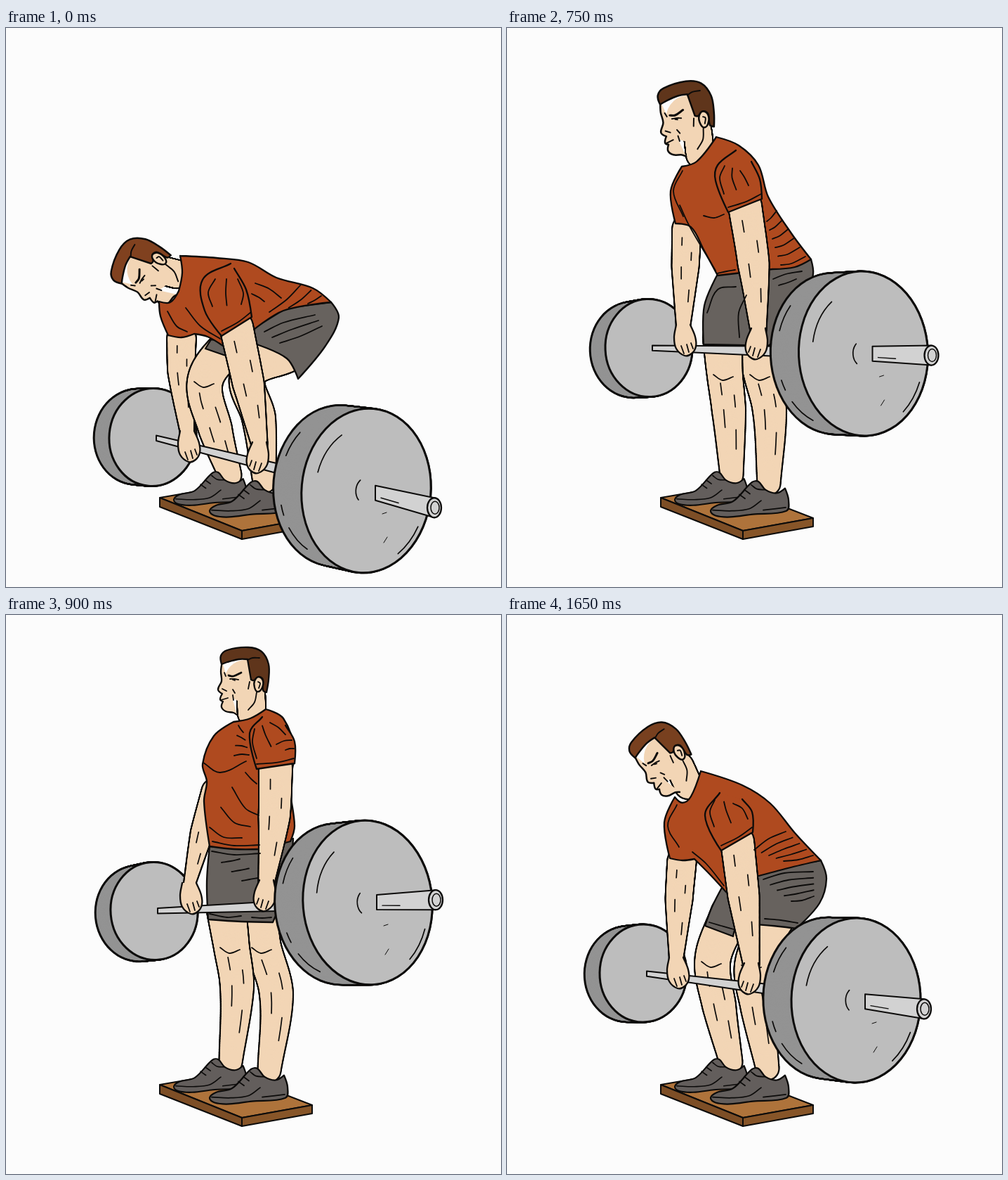
Write an HTML page with a canvas that moves like this. It is 705 px wide and 795 px high and loops after 1.67 s.

```html
<!DOCTYPE html>
<html lang="en">
<head>
<meta charset="utf-8">
<title>Deadlift</title>
<style>
html, body { margin: 0; width: 100%; height: 100%; overflow: hidden; background: #fcfcfc; }
canvas { display: block; }
</style>
</head>
<body>
<canvas id="stage" width="705" height="795"></canvas>
<script>
const ctx = document.getElementById('stage').getContext('2d');
const LINE = '#0c0b0a', SKIN = '#f2d5b5', SHIRT = '#af4a1f', SHORTS = '#67625e', SHOE = '#635e5c';
const FACE = '#bdbdbd', RIM = '#939393', STEEL = '#d2d2d2';
const TAU = Math.PI * 2;
ctx.lineJoin = ctx.lineCap = 'round';

const mix = (a, b, t) => a + (b - a) * t;

// "x,y" points; a trailing "!" marks a sharp corner.
const parse = text => text.trim().split(/\s+/).map(s => {
  const [x, y] = s.split(',').map(parseFloat);
  return { x, y, sharp: s.endsWith('!') };
});

// Bezier segments of a smooth curve through the points.
function segments(pts, closed) {
  const n = pts.length;
  const at = i => closed ? pts[(i + n) % n] : pts[Math.max(0, Math.min(n - 1, i))];
  const handle = (i, reach) => {
    const p = at(i), a = at(i - 1), b = at(i + 1);
    const k = p.sharp ? 0 : reach / (Math.hypot(b.x - a.x, b.y - a.y) || 1);
    return { x: p.x + (b.x - a.x) * k, y: p.y + (b.y - a.y) * k };
  };
  return Array.from({ length: closed ? n : n - 1 }, (_, i) => {
    const p = at(i), q = at(i + 1), reach = Math.hypot(q.x - p.x, q.y - p.y) / 3;
    return [p, handle(i, reach), handle(i + 1, -reach), q];
  });
}

function along([p, c, d, q], t) {
  const s = 1 - t;
  const bez = k => s * s * s * p[k] + 3 * s * s * t * c[k] + 3 * s * t * t * d[k] + t * t * t * q[k];
  return { x: bez('x'), y: bez('y') };
}

function trace(pts, closed) {
  const path = new Path2D();
  path.moveTo(pts[0].x, pts[0].y);
  for (const [, c, d, q] of segments(pts, closed)) path.bezierCurveTo(c.x, c.y, d.x, d.y, q.x, q.y);
  return path;
}

function paint(path, fill, width = 2.3) {
  ctx.lineWidth = width;
  ctx.strokeStyle = LINE;
  if (fill) { ctx.fillStyle = fill; ctx.fill(path); }
  ctx.stroke(path);
}

const shape = (fill, text) => text.split('/').forEach(s => paint(trace(parse(s), true), fill));
const open = (fill, text) => paint(trace(parse(text), false), fill);
const ink = (text, width = 1.8) => text.split('/').forEach(s => paint(trace(parse(s), false), null, width));
const poly = (fill, ...pts) => paint(new Path2D('M' + pts.join('L') + 'Z'), fill, 2);

function ellipse(x, y, rx, ry = rx, tilt = 0, from = 0, to = TAU) {
  const path = new Path2D();
  path.ellipse(x, y, rx, ry, tilt, from, to);
  return path;
}

function placed(x, y, draw, { turn = 0, sx = 1, sy = 1 } = {}) {
  ctx.save();
  ctx.translate(x, y);
  ctx.rotate(turn);
  ctx.scale(sx, sy);
  draw();
  ctx.restore();
}

// Outlined union of ellipses moving with t from 0 to 1.
function sweep(fill, steps, edge, ellipseAt) {
  for (const [color, grow] of [[LINE, edge], [fill, -edge]]) {
    ctx.fillStyle = color;
    for (let i = 0; i <= steps; i++) ctx.fill(ellipseAt(i / steps, grow));
  }
}

// A tapering limb through its joints, with one half-width per joint.
function limb(joints, widths, marksFrom) {
  const segs = segments(joints, false);
  const spot = t => {
    const u = t * segs.length, i = Math.min(segs.length - 1, Math.floor(u));
    return { ...along(segs[i], u - i), r: mix(widths[i], widths[i + 1], u - i) };
  };
  sweep(SKIN, 90, 1.15, (t, grow) => {
    const { x, y, r } = spot(t);
    return ellipse(x, y, r + grow);
  });
  if (marksFrom === undefined) return;
  for (let k = 0; k < 4; k++) {
    const start = mix(marksFrom, .88, k / 4), side = k % 2 ? .4 : -.3;
    paint(trace([0, .05, .1].map(d => {
      const p = spot(start + d), q = spot(start + d + .01), len = Math.hypot(q.x - p.x, q.y - p.y);
      const off = p.r * side / len;
      return { x: p.x + (q.y - p.y) * off, y: p.y - (q.x - p.x) * off };
    })), null, 1.7);
  }
}

function leg(text) {
  const joints = parse(text), knee = joints[1];
  limb(joints, [28, 25.5, 24, 16.5], .42);
  placed(knee.x, knee.y, () => ink('-16,3 -3,11 12,6'));
}

const arm = (text, size) => limb(parse(text), [24, 22.5, 11.5].map(w => w * size), .12);

function hand(armText, dir) {
  const { x, y } = parse(armText).pop();
  placed(x, y, () => {
    open(SKIN, '-10,-3 -13,15 -10,31 2,41 12,38 18,28 17,14 10,-3');
    ink('-3,27 1,38 / 5,25 8,36 / 11,23 14,31');
  }, { sx: dir });
}

const shoe = (x, y, size) => placed(x, y, () => {
  shape(SHOE, '0,43 9,35 32,29 59,1 68,0 78,12 94,17 106,10! 111,27 108,43 60,48 28,52 7,50');
  ink('3,42 30,43 55,40 72,28 / 75,42 107,38 / 41,19 49,25 / 48,12 56,18 / 58,5 66,11 78,12');
}, { sx: size, sy: size - .03 });

function board() {
  poly('#ae733b', '219 668', '300 654', '330 656', '436 697', '336 715');
  poly('#7d4e26', '219 668', '336 715', '336 727', '219 681');
  poly('#875528', '336 715', '436 697', '436 709', '336 727');
}

function head({ x, y, turn, size, hair }, collar) {
  const c = Math.cos(turn) * size, s = Math.sin(turn) * size;
  limb([{ x: x + 18 * c - 12 * s, y: y + 18 * s + 12 * c }, parse(collar)[0]], [20, 20]);
  placed(x, y, () => {
    open(SKIN, '-23,-36! -25,-22 -24,-8 -29,4 -23,10! -26,18 -22,21! -24,29 -18,35 -7,37 -2,40');
    ctx.fill(ellipse(10, -8, 30));
    shape(hair, '-24,-32! -25,-44 -16,-52 14,-56 33,-50 43,-32 43,-10 40,8! 35,5 35,-10 29,-14 22,-9 18,-10! 13,-39! 0,-39 -16,-35');
    shape(SKIN, '23,-8 29,-14 35,-8 33,3 27,7 23,1');
    ink('-14,-16 -7,-15 4,-20', 2.8);
    ink('-12,-11 -6,-11 0,-10 / -8,-10 -5,-9 / -23,3 -17,6 / -25,19 -15,16 / -8,4 -5,9 / -8,12 -7,19');
    ink('16,-7 14,3 / 13,-38 20,-41 30,-41 / 28,-7 31,-5 29,2 / 26,8 23,22 14,33 / -20,-20 -18,-15');
  }, { turn, sx: size, sy: size });
}

// Creases blended from the first curve to the last one.
function folds(first, last, count) {
  const a = parse(first), b = parse(last);
  for (let i = 0; i < count; i++) {
    const t = i / (count - 1);
    paint(trace(a.map((p, k) => ({ x: mix(p.x, b[k].x, t), y: mix(p.y, b[k].y, t) }))), null, 1.8);
  }
}

// A thick disc whose back lies (dx,dy) away from its face.
function plate(x, y, dx, dy, rx, ry, tilt) {
  sweep(RIM, 40, 1.5, (t, grow) => {
    const k = mix(.98, 1, t), s = 1 - t;
    return ellipse(x + dx * s, y + dy * s, rx * k + grow, ry * k + grow, tilt);
  });
  paint(ellipse(x, y, rx, ry, tilt), FACE, 3);
}

function barbell({ far, near }) {
  const slope = (near.y - far.y) / (near.x - far.x), tilt = (slope - .1) * .6;
  const taper = (x1, w1, x2, w2) => {
    const [y1, y2] = [x1, x2].map(x => far.y + (x - far.x) * slope);
    poly(STEEL, [x1, y1 - w1], [x2, y2 - w2], [x2, y2 + w2], [x1, y1 + w1]);
    return y2;
  };
  return {
    farPlate: () => plate(far.x, far.y, -23, 3 - slope * 15, 62, 69.5, tilt),
    bar: () => taper(far.x + 5, 3.7, near.x, 9.5),
    nearPlate() {
      const { x, y } = near, dy = 1 - slope * 32, rx = 92, ry = 117;
      plate(x, y, -42, dy, rx, ry, tilt);
      const arc = (dx, dy, k, from, to) =>
        paint(ellipse(x + dx, y + dy, rx * k, ry * k, tilt, from, to), null, 1.7);
      arc(0, 0, .79, 3.36, 4.1);
      arc(0, 0, .16, 2.3, 4);
      arc(0, 0, .93, .42, .9);
      for (const [from, to] of [[3.5, 3.9], [2.65, 2.8], [2, 2.45]]) arc(-42, dy, .88, from, to);
      placed(x, y, () => ink('23,33 29,31 / 25,74 30,66', 1));
      const ex = x + 97, ey = taper(x + 13, 10.5, ex, 14);
      paint(ellipse(ex, ey, 10, 14), STEEL);
      paint(ellipse(ex + 1, ey, 6, 9), STEEL, 1.5);
      placed(x, y, () => ink(`21,${21 * slope + 5} 46,${46 * slope + 6}`, 1.4));
    }
  };
}

function sleeve(text) {
  open(SHIRT, text);
  const [front, back] = parse(text).filter(p => p.sharp);
  ink(`${front.x},${front.y - 7} ${mix(front.x, back.x, .55)},${mix(front.y, back.y, .55) - 5} ${back.x - 1},${back.y - 7}`);
}

function lifter(pose) {
  const { farPlate, bar, nearPlate } = barbell(pose);
  farPlate();
  board();
  arm(pose.farArm, pose.farSize || .86);
  leg(pose.nearLeg);
  leg(pose.farLeg);
  shape(SHORTS, pose.shorts);
  shoe(239, 632, .93);
  shoe(290, 645, 1);
  head(pose.head, pose.collar);
  shape(SHIRT, pose.torso);
  bar();
  hand(pose.farArm, 1);
  arm(pose.nearArm, 1);
  hand(pose.nearArm, -1);
  sleeve(pose.sleeve);
  pose.folds.forEach(f => folds(...f));
  nearPlate();
}

const low = {
  far: { x: 209, y: 582 }, near: { x: 513, y: 658 },
  head: { x: 207, y: 357, turn: -1.08, size: 1.07, hair: '#80411f' }, collar: '243,350',
  farArm: '250,440 250,490 258,576', nearArm: '328,425 345,505 361,592',
  farLeg: '330,440 284,500 298,570 319,636', nearLeg: '400,462 345,492 360,555 368,645',
  shorts: '292,443! 284,456! 313,466! 318,446! / 463,390! 474,412 455,452 416,499! 400,470 354,449! 348,430! 400,398!',
  torso: '248,324! 251,348 246,374! 234,390 218,389! 220,410 231,437! 250,440 268,435! 287,439 309,452! 349,432! 395,402 463,390! 437,370 385,355 345,333 300,327',
  sleeve: '320,335 280,358 283,402 307,438! 350,411! 342,372 325,342',
  folds: [
    ['375,404 400,386 420,365', '430,392 440,387 449,381', 3],
    ['294,396 288,376 298,357', '335,393 338,377 330,357', 3],
    ['230,403 243,424 258,432', '256,398 277,424 305,442', 2],
    ['355,363 375,371 392,384', '350,378 360,383 368,389', 2],
    ['368,432 395,419 440,408', '390,448 420,438 450,424', 3]
  ]
};

const rising = {
  far: { x: 194, y: 509.5 }, near: { x: 497, y: 548 },
  head: { x: 223, y: 216, turn: -.62, size: 1.06, hair: '#78401f' }, collar: '258,242',
  farArm: '249,350 245,405 241,490', nearArm: '328,322 337,400 348,498',
  farLeg: '318,425 293,490 302,555 319,636', nearLeg: '385,425 350,495 357,560 371,645',
  shorts: '307,386! 292,415 282,442! 322,457! 330,441 412,446! 445,410 455,375 447,349! 400,357 350,368!',
  torso: '276,222! 262,258 250,267 239,259! 224,295 232,346! 250,349 267,347! 290,370 312,394! 355,372! 400,360 447,349! 410,310 375,268 335,242',
  sleeve: '303,253 282,285 305,335! 350,309! 349,280 335,262',
  folds: [
    ['352,334 373,318 397,308', '394,350 415,348 436,342', 5],
    ['296,263 289,280 295,301', '322,268 335,275 343,290', 3],
    ['242,270 229,300 245,330', '264,337 284,354 309,385', 2],
    ['365,376 395,367 436,365', '405,407 420,406 437,400', 5],
    ['288,437 305,442 323,447', '367,432 390,434 414,438', 2]
  ]
};

const leaning = {
  far: { x: 202, y: 455 }, near: { x: 507.5, y: 463 },
  head: { x: 250, y: 139, turn: -.17, size: 1.1, hair: '#5f351b' }, collar: '275,180',
  farArm: '256,285 254,340 251,425', nearArm: '339,253 351,335 358,430',
  farLeg: '307,440 310,490 316,545 320,636', nearLeg: '352,435 362,490 374,545 373,648',
  shorts: '300,350! 281,395 280,450! 331,451! 372,452! 420,420! 436,350 433,329! 380,340!',
  torso: '298,155! 270,190 249,197! 233,232 240,278! 262,283 280,315 300,352! 378,343! 410,340 433,329! 405,292 372,240 358,195 330,167',
  sleeve: '326,174 300,195 297,217 315,262! 363,243! 360,215 348,190',
  folds: [
    ['370,275 376,270 384,260', '390,337 405,335 425,325', 6],
    ['310,196 303,213 309,236', '332,203 338,212 344,224', 3],
    ['250,203 237,232 251,268', '246,252 260,282 297,345', 2],
    ['280,267 295,270 309,265', '300,349 313,346 325,344', 2],
    ['285,405 300,372 326,368', '331,440 330,405 341,380', 2],
    ['379,357 397,350 420,346', '387,366 400,362 412,357', 2]
  ]
};

const upright = {
  far: { x: 211, y: 421 }, near: { x: 515, y: 409 },
  head: { x: 331, y: 102, turn: 0, size: 1, hair: '#5f351b' }, collar: '350,140',
  farArm: '296,250 279,310 261,384', farSize: .72, nearArm: '384,217 382,287 371,380',
  farLeg: '314,420 321,470 329,530 320,636', nearLeg: '358,425 366,470 385,540 375,648',
  shorts: '290,329! 286,380 288,433! 335,436 380,437! 405,380! 409,318! 364,332!',
  torso: '370,134! 348,147 324,152! 296,172 280,212 286,237 282,265 290,329! 325,333 364,333! 405,322! 411,300 404,240 411,195 395,147',
  sleeve: '365,145 347,168 357,219! 411,211! 411,180 398,157',
  folds: [
    ['281,210 305,224 342,208', '341,224 349,233 357,240', 2],
    ['331,157 334,162 338,167', '325,200 336,198 346,199', 4],
    ['322,245 341,275 360,285', '290,302 310,316 336,317', 3],
    ['354,162 351,181 357,204', '376,153 388,160 398,170', 3],
    ['385,184 396,179 407,178', '398,192 404,190 410,190', 2],
    ['294,322 325,328 361,327', '293,336 325,341 362,339', 2],
    ['307,352 320,350 333,347', '336,378 347,376 359,374', 3],
    ['290,425 315,430 335,428', '350,430 365,431 378,430', 2]
  ]
};

const steps = [[600, low], [750, rising], [900, leaning], [1500, upright], [1650, leaning], [1670, rising]];
let shown;

function frame() {
  const t = performance.now() % 1670;
  const pose = steps.find(([end]) => t < end)[1];
  if (pose !== shown) {
    ctx.fillStyle = '#fcfcfc';
    ctx.fillRect(0, 0, 705, 795);
    lifter(pose);
    shown = pose;
  }
  requestAnimationFrame(frame);
}
frame();
</script>
</body>
</html>
```
